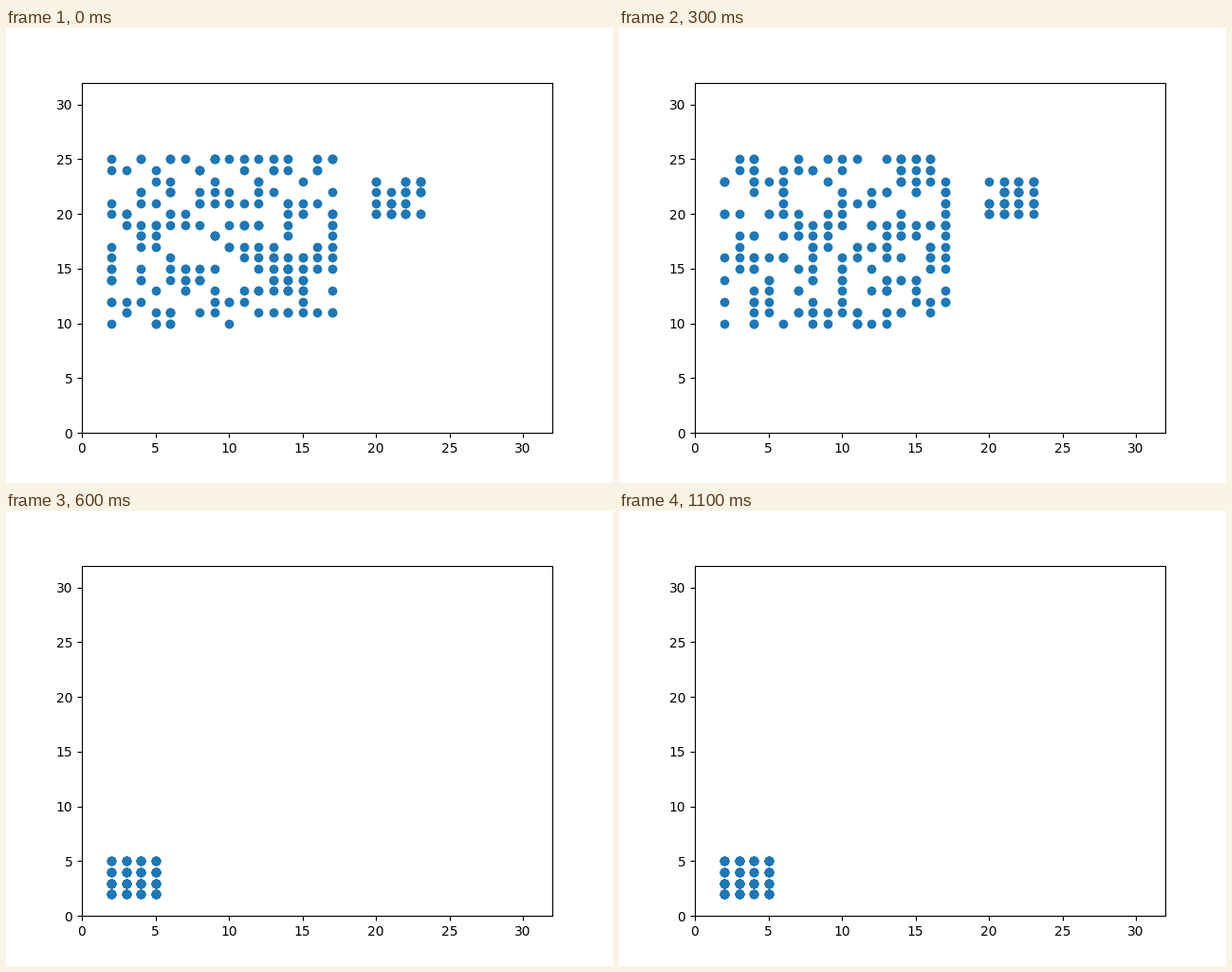
Write a matplotlib script that moves like this. It is 640x480 px and loops after 1.15 s.

```python
import itertools

import matplotlib.pyplot as plt
import numpy as np
from matplotlib.animation import FuncAnimation

TICK_MS = 50
TICKS = 23
TICKS_PER_STEP = 2
OPEN_STEPS = 4      # steps before all points jump to the corner
# cells of the side block left empty in each open step
GAPS = ([(21, 23), (23, 21)], [(23, 21)], [(21, 21)], [(20, 22)])


def scatter(rng, x0, y0, size, n):
    """Random lattice points in a square with lower left cell (x0, y0)."""
    return rng.integers(0, size, (n, 2)) + (x0, y0)


def packed(rng, x0, y0, size, extra):
    """Every cell of a square once, plus random repeats."""
    cells = list(itertools.product(range(size), repeat=2))
    return np.vstack([np.array(cells) + (x0, y0), scatter(rng, x0, y0, size, extra)])


def without(points, cells):
    return [p for p in points if tuple(p) not in cells]


def points_at(step):
    rng = np.random.default_rng(40 + step)
    if step < OPEN_STEPS:
        field = scatter(rng, 2, 10, 16, 200)
        block = without(packed(rng, 20, 20, 4, 24), GAPS[step])
        return np.vstack([field, block])
    return packed(rng, 2, 2, 4, 84)


fig, ax = plt.subplots(figsize=(6.4, 4.8), dpi=100)
ax.set(xlim=(0, 32), ylim=(0, 32))
dots, = ax.plot([], [], "o", color="#1f77b4")


def update(tick):
    dots.set_data(*points_at(tick // TICKS_PER_STEP).T)
    return dots,


anim = FuncAnimation(fig, update, frames=TICKS, interval=TICK_MS, repeat=True,
                     repeat_delay=0)
plt.show()
```
